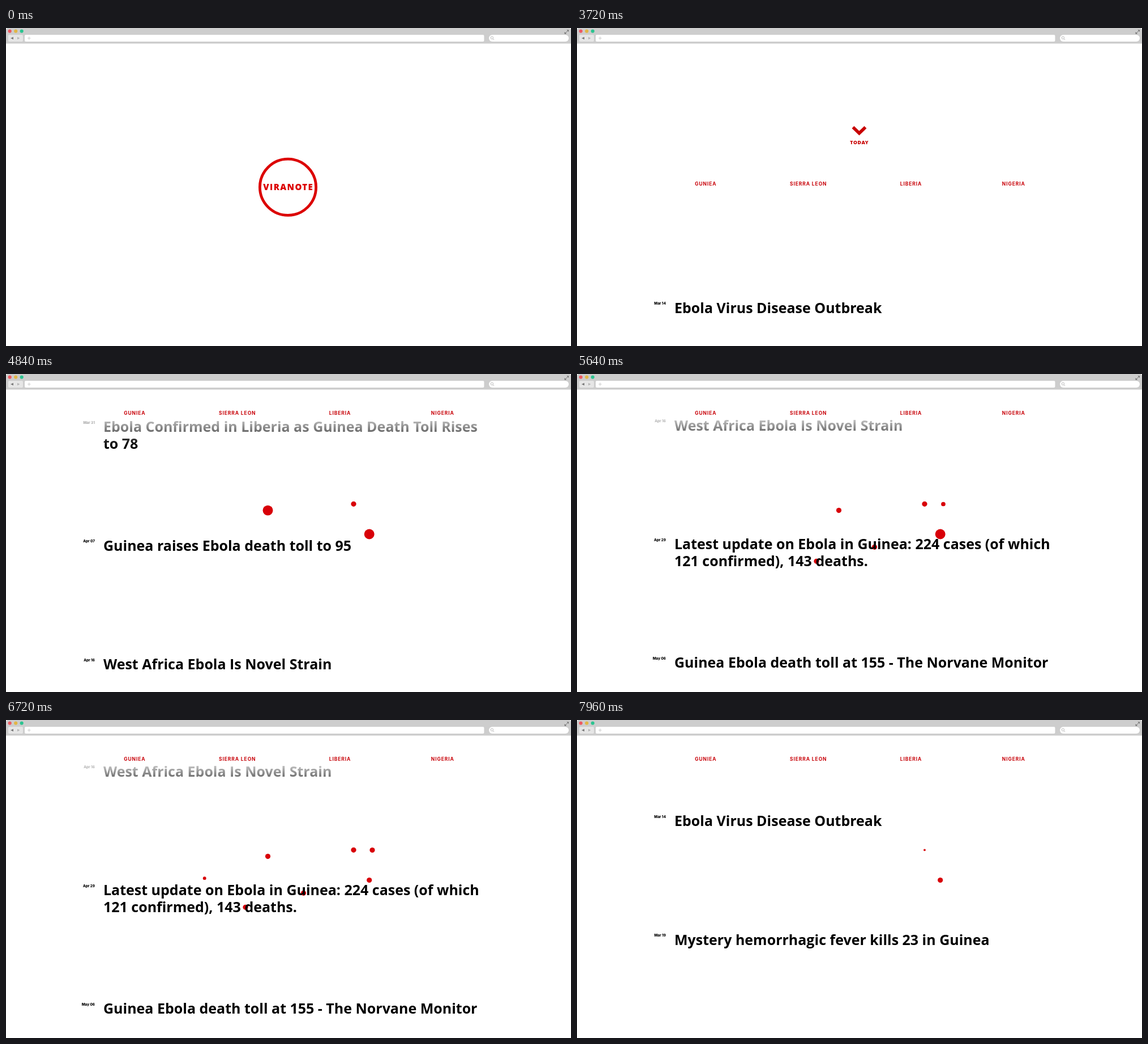
Recreate the animation shown at these times as an HTML page. Size 998 by 561 pixels, loop 8000 ms.

```html
<!DOCTYPE html>
<html lang="en">
<head>
<meta charset="utf-8">
<title>Outbreak timeline</title>
<style>
  html, body { margin: 0; height: 100%; overflow: hidden; background: #fff; }
  svg { display: block; width: 100vw; height: 100vh; }
  text { font-family: "Open Sans", sans-serif; font-weight: 800; }
  .logo { font-size: 15px; letter-spacing: 1.4px; fill: #dc0000; text-anchor: middle; }
  .today { font-size: 8.8px; letter-spacing: .6px; fill: #c80000; text-anchor: middle; }
  .title { font-size: 25px; font-weight: 700; }
  .date { font: 800 6.3px Inter, sans-serif; text-anchor: end; }
  .country { font: 700 8.5px Inter, sans-serif; letter-spacing: .9px; fill: #c80008; text-anchor: middle; }
</style>
</head>
<body>
<svg viewBox="0 0 998 561">
  <defs>
    <linearGradient id="fade" x1="0" y1="0" x2="0" y2="1">
      <stop offset=".4" stop-color="#fff"/>
      <stop offset="1" stop-color="#fff" stop-opacity="0"/>
    </linearGradient>
  </defs>
  <g id="dots" fill="#d80008"></g>
  <g id="page">
    <g id="logo">
      <circle r="49.6" fill="none" stroke="#dc0000" stroke-width="4.8"/>
      <text class="logo" x=".7" y="5.3">VIRANOTE</text>
    </g>
    <g id="today">
      <path d="M487.5 521.5L498.5 532L509.5 521.5" fill="none" stroke="#c80000" stroke-width="5.6"/>
      <text class="today" x="498.8" y="551.6">TODAY</text>
    </g>
    <g id="news"></g>
  </g>
  <g id="nav"><rect y="-42" width="998" height="100" fill="url(#fade)"/></g>
  <g id="chrome">
    <path d="M0 27.5V4Q0 0 4 0H994Q998 0 998 4V27.5Z" fill="#cdcdcd"/>
    <circle cx="6.7" cy="5.5" r="3.1" fill="#ee5a62"/>
    <circle cx="17.2" cy="5.5" r="3.1" fill="#e2b645"/>
    <circle cx="27.7" cy="5.5" r="3.1" fill="#2cc490"/>
    <rect x="4" y="12" width="26" height="12" rx="2" fill="#e6e6e6"/>
    <path d="M8 18L13 15.7V20.3Z" fill="#777"/>
    <path d="M24.5 18L20 15.7V20.3Z" fill="#b5b5b5"/>
    <rect x="33" y="12" width="811.5" height="12" rx="2" fill="#fff"/>
    <path d="M38 18H43.5M40.8 15.2V20.8" stroke="#ccc"/>
    <rect x="853" y="12" width="141" height="12" rx="6" fill="#fff"/>
    <g fill="none" stroke="#bbb"><circle cx="858.4" cy="17.2" r="2.2"/><path d="M860 19L862.2 21.2"/></g>
    <path d="M994 3.3V7L990.3 3.3ZM986.5 10.5V6.8L990.2 10.5Z" fill="#777"/>
    <path d="M987.5 9.5L993 4.3" stroke="#777"/>
  </g>
</svg>
<script>
const LOOP = 8000, SCROLL_END = 1796.3, DOT_RADIUS = 4.6;
const $ = id => document.getElementById(id);

function add(parent, tag, attrs, text = "") {
  const el = document.createElementNS("http://www.w3.org/2000/svg", tag);
  for (const name in attrs) el.setAttribute(name, attrs[name]);
  el.textContent = text;
  return parent.appendChild(el);
}

const news = [
  ["Mar 14", "Ebola Virus Disease Outbreak"],
  ["Mar 19", "Mystery hemorrhagic fever kills 23 in Guinea"],
  ["Mar 25", "Guinea confirms Ebola outbreak"],
  ["Mar 31", "Ebola Confirmed in Liberia as Guinea Death Toll Rises", "to 78"],
  ["Apr 07", "Guinea raises Ebola death toll to 95"],
  ["Apr 16", "West Africa Ebola Is Novel Strain"],
  ["Apr 29", "Latest update on Ebola in Guinea: 224 cases (of which", "121 confirmed), 143 deaths."],
  ["May 06", "Guinea Ebola death toll at 155 - The Norvane Monitor"],
];
news.forEach(([date, ...lines], i) => {
  const y = 840 + 209.35 * i;
  add($("news"), "text", { class: "date", x: 157, y: y - 5.3 }, date);
  lines.forEach((line, n) =>
    add($("news"), "text", { class: "title", x: 172, y: y + 9 + 30 * n }, line));
});

["GUNIEA", "SIERRA LEON", "LIBERIA", "NIGERIA"].forEach((name, i) =>
  add($("nav"), "text", { class: "country", x: 227.4 + 181.3 * i, y: 3.1 }, name));

// Map dots in order of outbreak; a third value is when its doubled size ends
const dots = [
  [641.7, 282.5, 6000], [614, 229.3], [462.5, 240.6, 5200], [525.5, 305.3],
  [423, 330.3], [647, 229.5], [350.7, 279.2],
].map(([cx, cy, swellEnd]) => ({ el: add($("dots"), "circle", { cx, cy }), swellEnd }));

const progress = (t, start, length) => Math.min(1, Math.max(0, (t - start) / length));
const smooth = u => u * u * (3 - 2 * u);
const glide = u => 1 - (1 - u ** 1.303) ** 1.64;

// Rises from start and is back to 0 at end
const envelope = (t, start, end, fade) =>
  smooth(progress(t, start, fade)) * (1 - smooth(progress(t, end - fade, fade)));

const bump = (t, start, length) => Math.sin(Math.PI * progress(t, start, length)) ** 2;

// Dots appear one by one and leave in reverse order
function dotRadius(t, i, swellEnd) {
  const shown = envelope(t, 3790 + 330 * i, 8320 - 240 * i, 270);
  const swell = swellEnd ? envelope(t, 4550, swellEnd, 270) : 0;
  return DOT_RADIUS * shown * (1 + swell * .95);
}

function draw(now) {
  const t = now % LOOP;
  const scroll = SCROLL_END * (glide(progress(t, 3240, 2410)) - glide(progress(t, 6720, 2267)));
  const scale = 1 + .18 * bump(t, 160, 580) + .015 * bump(t, 960, 180);
  $("page").setAttribute("transform", `translate(0 ${-scroll})`);
  $("logo").setAttribute("transform", `translate(498 280.8) scale(${scale})`);
  $("today").setAttribute("visibility", t < 2120 ? "hidden" : "visible");
  $("nav").setAttribute("transform", `translate(0 ${Math.max(68.6, 621.5 - scroll)})`);
  dots.forEach(({ el, swellEnd }, i) => el.setAttribute("r", dotRadius(t, i, swellEnd)));
  requestAnimationFrame(() => draw(performance.now()));
}
draw(performance.now());
</script>
</body>
</html>
```
